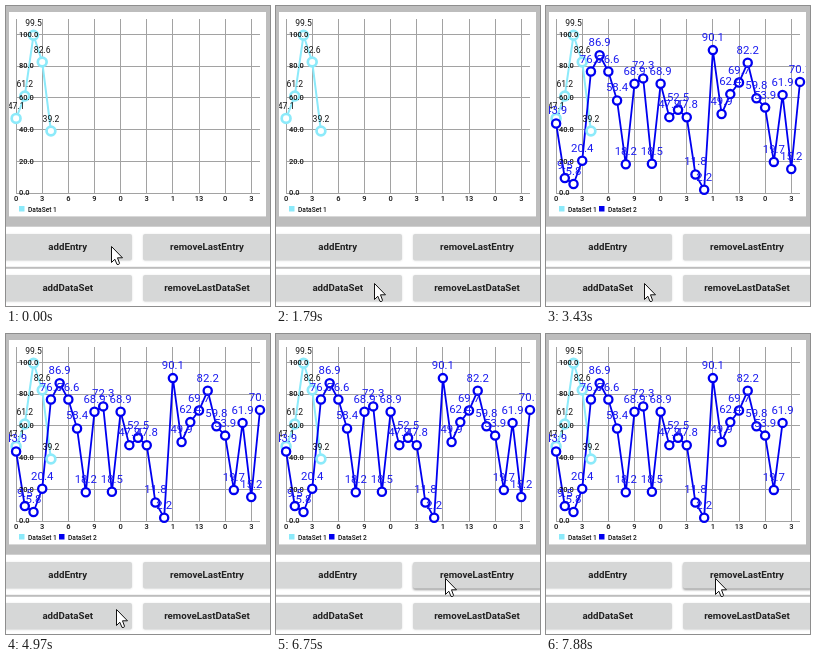
An HTML page that plays this animation: 264 by 300 pixels, repeating every 8000 ms.

```html
<!DOCTYPE html>
<html lang="en">
<head>
<meta charset="utf-8">
<title>Line chart</title>
<style>
  html, body { margin: 0; width: 100%; height: 100%; overflow: hidden; background: #fff; }
  svg { display: block; width: 100vw; height: 100vh; }
  text { font-family: Roboto, Arial, sans-serif; }
  .mid { text-anchor: middle; }
  .small { font-weight: 500; fill: #111; }
  .button { font-size: 9.7px; font-weight: 600; fill: #222; }
</style>
</head>
<body>
<svg viewBox="0 0 264 300">
  <defs>
    <clipPath id="chart"><rect x="3" y="6" width="257" height="204"/></clipPath>
    <filter id="blur" x="-10%" y="-40%" width="120%" height="180%"><feGaussianBlur stdDeviation="1.3"/></filter>
  </defs>
  <rect width="264" height="220.7" fill="#bdbdbd"/>
  <rect x="3" y="6" width="257" height="204.4" fill="#fff"/>
  <rect y="260.8" width="264" height="2" fill="#bdbdbd"/>
  <path id="grid" stroke="#a2a2a2"/>
  <g id="data" clip-path="url(#chart)"></g>
  <g id="buttons"></g>
  <path id="cursor" d="M.5 .5V16.5L3.8 13.2L6 18.4L7.7 18.5L8.5 17.2L6.5 11.8H11.5Z" fill="#fff" stroke="#111"/>
</svg>
<script>
const LOOP = 8000, TICK = 130, HOLD = 120;
const get = id => document.getElementById(id);
const range = n => [...Array(n).keys()];
const px = i => 10.1 + 8.71 * i;
const py = v => 187.2 - 1.588 * v;

const cyan = {
  name: 'DataSet 1', color: '#8ceafa', ink: '#111', size: 8.6, width: 2, r: 4.4, ring: 2.7, legendX: 13,
  values: [47.1, 61.2, 99.5, 82.6, 39.2]
};
const blue = {
  name: 'DataSet 2', color: '#0000f0', ink: '#1c1cf0', size: 11.4, width: 1.8, r: 4.1, ring: 2.3, legendX: 53,
  values: [43.9, 9.5, 5.8, 20.4, 76.6, 86.9, 76.6, 58.4, 18.2, 68.9, 72.3, 18.5, 68.9, 47.9, 52.5,
    47.8, 11.8, 2.2, 90.1, 49.9, 62.4, 69.7, 82.2, 59.8, 53.9, 19.7, 61.9, 15.2, 70.1]
};

const names = ['addEntry', 'removeLastEntry', 'addDataSet', 'removeLastDataSet'];
const clicks = [
  { time: 3310, name: 'addDataSet' },
  ...[6750, 7310, 7880].map(time => ({ time, name: 'removeLastEntry' }))
];
const home = [105, 240], add = [98, 277], remove = [169, 244];
const glides = [
  { start: 1270, steps: 5, from: home, to: add, ease: 2, bend: 1 },
  { start: 4970, steps: 7, from: add, to: remove, ease: 1.25, bend: 1.7 }
];

// The pointer slows towards its goal and is redrawn once per tick.
function cursorAt(t) {
  const g = glides.findLast(g => t >= g.start);
  if (!g) return home;
  const u = Math.min(1, (Math.floor((t - g.start) / TICK) + 1) / g.steps);
  const p = 1 - (1 - u) ** g.ease;
  const mix = (k, p) => Math.round(g.from[k] + (g.to[k] - g.from[k]) * p);
  return [mix(0, p), mix(1, p ** g.bend)];
}

// A click takes effect when the button is released.
function pointsAt(t) {
  return clicks.filter(c => t >= c.time + HOLD)
    .reduce((n, c) => c.name === 'addDataSet' ? blue.values.length : n - 1, 0);
}

const pressedAt = t => clicks.find(c => t >= c.time && t < c.time + HOLD)?.name;

function drawGrid() {
  const snap = v => Math.floor(v) + .5;
  get('grid').setAttribute('d',
    range(10).map(i => `M${snap(px(3 * i))} 13V187`).join('') +
    range(6).map(i => `M10 ${snap(py(20 * i))}H254`).join(''));
}

function axisLabels() {
  const xNames = [0, 3, 6, 9, 0, 3, 1, 13, 0, 3];
  return '<g class="small" font-size="7.5">' +
    xNames.map((n, i) => `<text class="mid" x="${px(3 * i)}" y="195">${n}</text>`).join('') +
    range(6).map(i => `<text x="13" y="${py(20 * i) + 2.2}">${(20 * i).toFixed(1)}</text>`).join('') + '</g>';
}

function drawData(count) {
  const sets = [cyan];
  if (count) sets.push({ ...blue, values: blue.values.slice(0, count) });
  const layer = f => sets.map(f).join('');
  const each = (s, f) => s.values.map((v, i) => f(px(i), py(v), v)).join('');
  const line = s => `<polyline points="${each(s, (x, y) => `${x},${y} `)}" fill="none"
    stroke="${s.color}" stroke-width="${s.width}"/>`;
  const dots = s => `<g fill="#fff" stroke="${s.color}" stroke-width="${s.ring}">` +
    each(s, (x, y) => `<circle cx="${x}" cy="${y}" r="${s.r}"/>`) + '</g>';
  const labels = s => `<g class="mid" font-size="${s.size}" fill="${s.ink}">` +
    each(s, (x, y, v) => `<text x="${x}" y="${y - 9}">${v.toFixed(1)}</text>`) + '</g>';
  const legend = s => `<rect x="${s.legendX}" y="200" width="5.5" height="5.5" fill="${s.color}"/>
    <text class="small" x="${s.legendX + 9}" y="205.5" font-size="6.6">${s.name}</text>`;
  get('data').innerHTML = layer(line) + layer(dots) + axisLabels() + layer(labels) + layer(legend);
}

function drawButtons(pressed) {
  get('buttons').innerHTML = names.map((name, i) => {
    const x = i % 2 ? 137 : -3, y = i < 2 ? 228 : 269, down = name === pressed;
    const box = (dy, style) => `<rect x="${x}" y="${y + dy}" width="129" height="26.4" rx="2" ${style}/>`;
    return box(down ? 1.6 : .4, `opacity="${down ? .4 : .12}" filter="url(#blur)"`) +
      box(0, 'fill="#d6d7d7"') +
      `<text class="button mid" x="${i % 2 ? 201 : 61.7}" y="${y + 16.2}">${name}</text>`;
  }).join('');
}

let shown;
function frame(now) {
  const t = now % LOOP, count = pointsAt(t), pressed = pressedAt(t), state = `${count} ${pressed}`;
  if (state !== shown) {
    drawData(count);
    drawButtons(pressed);
    shown = state;
  }
  get('cursor').setAttribute('transform', `translate(${cursorAt(t)})`);
  requestAnimationFrame(frame);
}

drawGrid();
frame(0);
</script>
</body>
</html>
```
